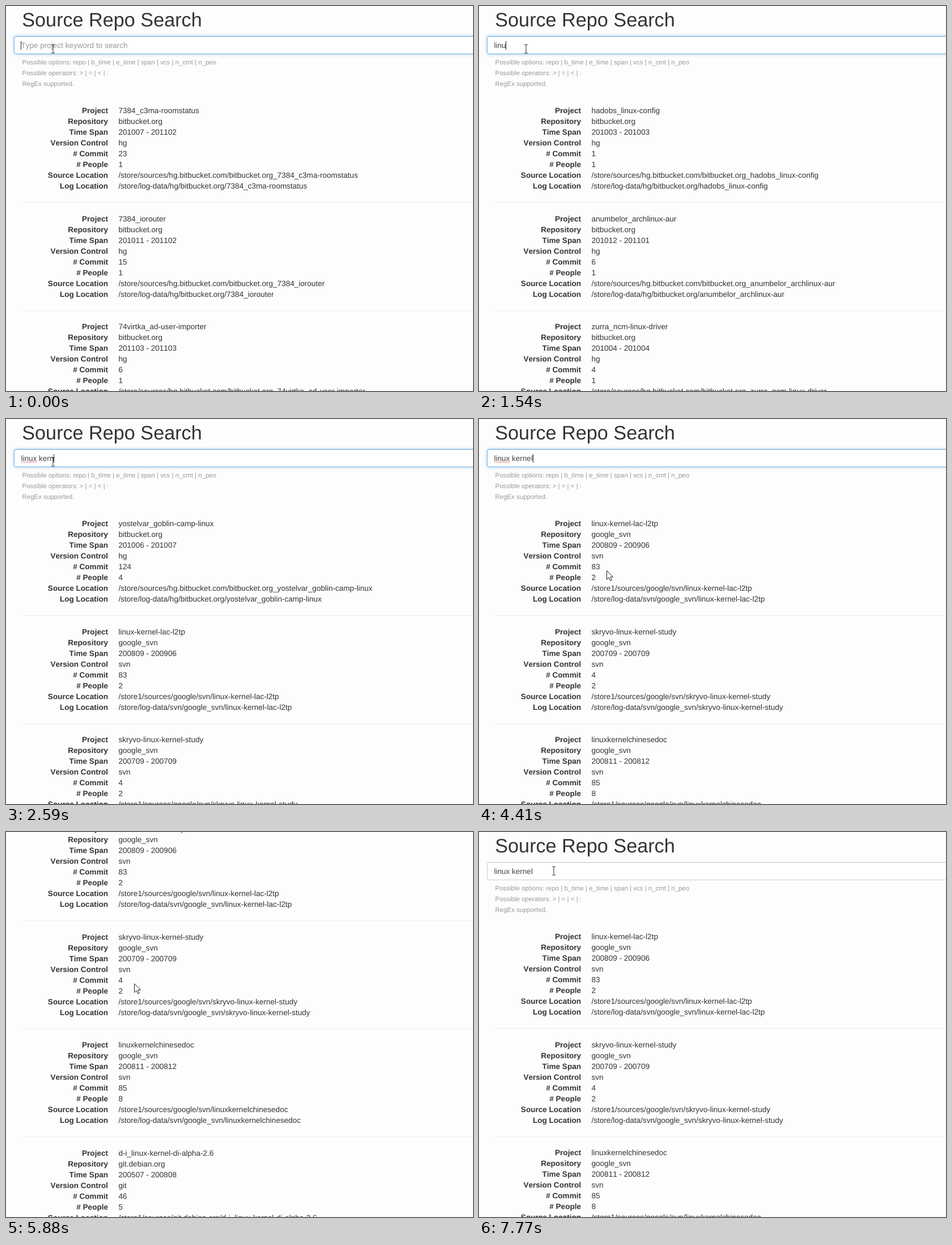
An HTML page that plays this animation: 824 px wide and 679 px high, repeating every 8 s.

```html
<!DOCTYPE html>
<html lang="en">
<head>
<meta charset="utf-8">
<title>Source Repo Search</title>
<style>
  html, body { margin: 0; width: 100%; height: 100%; overflow: hidden; background: #fdfdfd; }
  body {
    position: relative; color: #333; white-space: pre;
    font: 13.56px/19px "Liberation Sans", Arial, sans-serif;
    font-kerning: none; text-rendering: geometricPrecision;
  }
  #page, #page div, h1, svg { position: absolute; }
  #page, #list { left: 0; top: 0; width: 824px; }
  h1 { margin: 0; left: 28.3px; top: 6px; font-size: 34.2px; line-height: 38px; font-weight: 400; }
  #page #box {
    left: 14px; top: 53px; width: 840px; height: 32px; box-sizing: border-box;
    border: 1px solid; border-radius: 4px; background: #fff;
  }
  #hint, #typed { left: 26.4px; top: 62px; height: 15px; line-height: 15px; }
  #hint { color: #999; }
  #typed { color: #444; border-right: 1px solid; }
  #help { left: 28.5px; top: 91px; font-size: 11.46px; color: #999; }
  .item { left: 0; width: 824px; }
  .item b { position: absolute; right: 644px; top: 0; text-align: right; }
  .item span { position: absolute; left: 198.5px; top: 0; }
  .item i { position: absolute; left: 28px; right: 0; top: 171px; height: 1px; background: #eee; }
  svg { left: 0; top: 0; width: 824px; height: 679px; }
</style>
</head>
<body>
<div id="page">
  <h1>Source Repo Search</h1>
  <div id="box"></div>
  <div id="hint">Type project keyword to search</div>
  <div id="typed"></div>
  <div id="help">Possible options: repo | b_time | e_time | span | vcs | n_cmt | n_peo
Possible operators: &gt; | = | &lt; | :
RegEx supported.</div>
  <div id="list"></div>
</div>
<svg>
  <path id="wave" fill="none" stroke="#e04848" stroke-width=".8"/>
  <path id="beam" fill="none" stroke="#222" d="M-3-7.5h2.5l.5 .5l.5-.5h2.5M0-7v14M-3 7.5h2.5l.5-.5l.5 .5h2.5"/>
  <path id="arrow" fill="#fff" stroke="#222" d="M.5 .5v15.5l3.6-3.4l2.6 5.6l2.5-1.1l-2.5-5.4h4.9z"/>
</svg>
<script>
const LOOP = 8000;
const el = id => document.getElementById(id);

const LABELS = ['Project', 'Repository', 'Time Span', 'Version Control',
  '# Commit', '# People', 'Source Location', 'Log Location'].join('\n');
const HOSTS = {
  hg: ['bitbucket.org', '/store/sources/hg.bitbucket.com/bitbucket.org_'],
  svn: ['google_svn', '/store1/sources/google/svn/'],
  git: ['git.debian.org', '/store1/sources/git.debian.org/'],
};

// Each entry: name, time span, commits, people, version control
const entry = line => {
  const [name, from, to, commits, people, vcs = 'hg'] = line.split(' ');
  const [repo, path] = HOSTS[vcs];
  return [name, repo, `${from} - ${to}`, vcs, commits, people,
    path + name, `/store/log-data/${vcs}/${repo}/${name}`].join('\n');
};

const config = 'hadobs_linux-config 201003 201003 1 1';
const arch = 'anumbelor_archlinux-aur 201012 201101 6 1';
const goblin = 'yostelvar_goblin-camp-linux 201006 201007 124 4';
const lac = 'linux-kernel-lac-l2tp 200809 200906 83 2 svn';
const study = 'skryvo-linux-kernel-study 200709 200709 4 2 svn';

const LISTS = [
  [0, ['7384_c3ma-roomstatus 201007 201102 23 1', '7384_iorouter 201011 201102 15 1',
    '74virtka_ad-user-importer 201103 201103 6 1']],
  [980, ['dolnar_mail-filter 201008 201012 18 1', 'dolnar_calendar 201009 201101 9 1',
    'besmon_small-tools 201002 201003 5 2']],
  [1120, ['dolnar_mail-client 201008 201012 31 1', 'tamrosel_simple-list-widgets 201005 201009 12 1',
    'besmon_timeline 201001 201004 7 1']],
  [1330, ['besmon_linear-solver 201002 201006 14 1', config, arch]],
  [1540, [config, arch, 'zurra_ncm-linux-driver 201004 201004 4 1']],
  [2310, [goblin, 'dolnar_linux-toolkit 201009 201011 11 1', lac]],
  [2590, [goblin, lac, study]],
  [2730, [lac, study, 'linuxkernelchinesedoc 200811 200812 85 8 svn',
    'd-i_linux-kernel-di-alpha-2.6 200507 200808 46 5 git']],
];

const KEYS = [700, 910, 1330, 1540, 1610, 1750, 2100, 2240, 2310, 2590, 2730, 3150];
const SCROLL = [[0, 0], [5110, 95], [5880, 190], [6510, 95], [7000, 0]];
const POINTER = [
  [0, 'beam', 83, 75.5], [4200, 'arrow', 104, 100], [4270, 'arrow', 148, 167],
  [4410, 'arrow', 225, 267], [4480, 'arrow', 226, 267], [7560, 'arrow', 215, 225],
  [7630, 'arrow', 178, 140], [7700, 'beam', 143, 80], [7770, 'beam', 132, 68.5],
];

const latest = (steps, t) => steps.findLast(step => step[0] <= t);
const mix = (a, b, k) => a + (b - a) * k;

el('wave').setAttribute('d', 'M26.5 75' + 'l2 2l2-2'.repeat(7));

let shown;
function showList(items) {
  if (items === shown) return;
  shown = items;
  el('list').innerHTML = items.map((item, n) =>
    `<div class="item" style="top:${175.3 + 190.4 * n}px"><b>${LABELS}</b><span>${entry(item)}</span><i></i></div>`
  ).join('');
}

function render(t) {
  const query = 'linux kernel'.slice(0, KEYS.filter(k => k <= t).length);
  const caret = t < 70 || (t >= 560 && t < 3920) || (t >= 4410 && t < 4620);
  el('typed').textContent = query;
  el('typed').style.borderColor = caret ? '#222' : 'transparent';
  el('hint').style.display = query ? 'none' : '';
  el('wave').style.display = t >= 1750 && t < 4620 ? '' : 'none';

  // Focus ring fades out in three steps after the click elsewhere
  const focus = t < 4620 ? 1 : Math.max(0, 1 - (Math.floor((t - 4620) / 70) + 1) / 3);
  const border = [[204, 102], [204, 175], [204, 233]].map(([off, on]) => mix(off, on, focus));
  el('box').style.borderColor = `rgb(${border})`;
  el('box').style.boxShadow =
    `inset 0 1px 1px rgba(0,0,0,.075), 0 0 6px rgba(102,175,233,${.5 * focus})`;

  showList(latest(LISTS, t)[1]);
  el('page').style.top = -latest(SCROLL, t)[1] + 'px';

  const [, kind, x, y] = latest(POINTER, t);
  for (const id of ['beam', 'arrow']) {
    el(id).style.display = id === kind ? '' : 'none';
    el(id).setAttribute('transform', `translate(${x} ${y})`);
  }
}

function tick() {
  render(performance.now() % LOOP);
  requestAnimationFrame(tick);
}
tick();
</script>
</body>
</html>
```
